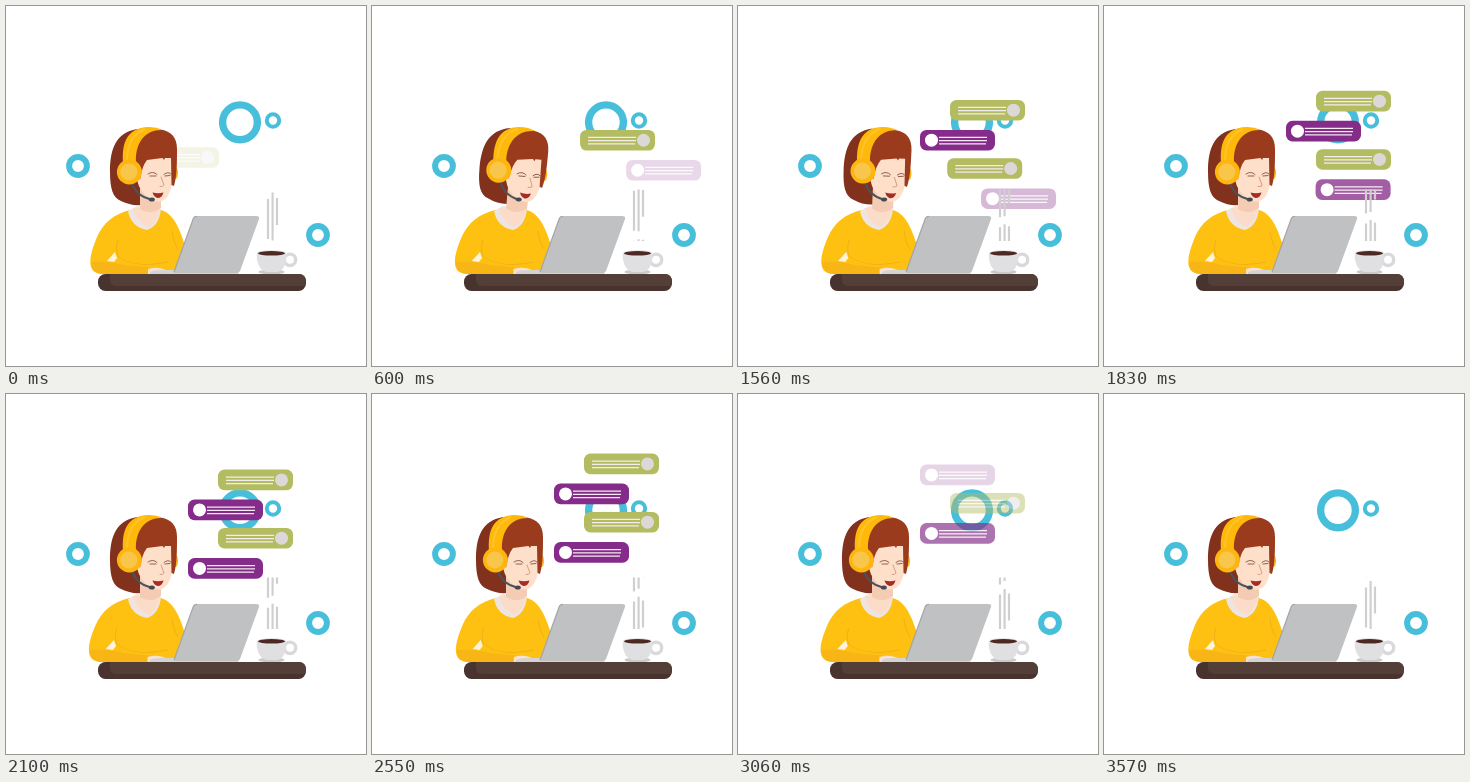
An HTML page that plays this animation: 360x360 px, repeating every 3600 ms.

```html
<!DOCTYPE html>
<html lang="en">
<head>
<meta charset="utf-8">
<title>Support chat</title>
<style>
  html, body { margin: 0; width: 100%; height: 100%; overflow: hidden; background: #fff; }
  svg { display: block; width: 100vw; height: 100vh; }
</style>
</head>
<body>
<svg viewBox="0 0 360 360">
  <defs>
    <clipPath id="steamArea"><rect x="255" y="183.5" width="24" height="51.5"/></clipPath>
    <g id="lines" fill="none" stroke="#f3ecee" stroke-width="1.3">
      <path d="M0 7.5H48M0 10.7H48M0 14H47"/>
    </g>
  </defs>

  <g fill="none" stroke="#48bfda">
    <circle cx="234" cy="116.3" r="17.4" stroke-width="7.4"/>
    <circle cx="267" cy="114.5" r="6.2" stroke-width="4"/>
    <circle cx="72" cy="160" r="8.9" stroke-width="6"/>
    <circle cx="312" cy="229" r="8.9" stroke-width="6"/>
  </g>

  <g id="bubbles"></g>

  <g id="steam" clip-path="url(#steamArea)" fill="none" stroke="#d0ced1" stroke-width="2.2"></g>

  <g id="cup">
    <circle cx="284" cy="253.8" r="5.7" fill="none" stroke="#d9d8db" stroke-width="3.4"/>
    <ellipse cx="265.5" cy="266" rx="13" ry="2.4" fill="#cbc9ce"/>
    <path d="M250.800 247C250 258 255 266 262 266H270C277 266 281 258 280.200 247Z" fill="#e0dfe2"/>
    <ellipse cx="265.500" cy="247.200" rx="14.800" ry="3.200" fill="#e8e6e8"/>
    <ellipse cx="265.500" cy="247.300" rx="13.500" ry="2.300" fill="#4c2a23"/>
  </g>

  <g id="body">
    <path d="M124 204C108 208 97 217 91 231C86 243 83 253 85 261Q87 268 97 268H168L181 246C176 230 170 208 155 204Z" fill="#fec111"/>
    <path d="M85 256Q100 254 118 259L158 263V268H97Q86 268 85 256Z" fill="#f8b616"/>
    <path d="M101 255L109 246L111 252L108 256Z" fill="#fff3dc"/>
    <path d="M112 250C121 258 139 261 162 256M112 234Q109 242 112 250M166 225Q167 235 172 243" fill="none" stroke="#f0b018" stroke-width="1"/>
    <path d="M142 263Q151 260 160 264L158 268H142Z" fill="#fbe1cf"/>
  </g>
  <path d="M122 205Q125 221 141 224Q153 220 155 203L148 200H131Z" fill="#eee5e3"/>
  <path d="M127 202Q130 217 143 221Q152 215 154 202Z" fill="#fbdcc8"/>

  <g id="head">
    <path d="M131 123C109 127 104 144 104 166C104 183 107 192 115 195Q125 200 135 199L140 150Z" fill="#82311d"/>
    <path d="M134 180V203Q144 210 155 202V188Z" fill="#f4ccb3"/>
    <path d="M131 150H167C169 169 166 187 159 193Q153 198 144 193Q134 187 131 174Z" fill="#fddfca"/>
    <ellipse cx="169.600" cy="167" rx="2.400" ry="6" fill="#fdb515"/>
    <path d="M128 154C127 136 139 122 154 123.500C166 125 171 132 171 143C171 157 171 170 168 180L165.500 179L165 152H159L158 154L156.500 152L141 154Q136 160 134 174Z" fill="#9b3b1e"/>
    <path d="M117 156C116 139 120 127 133 122.500Q146 119 157 124C140 123 129 136 130 156Z" fill="#ffb90b"/>
    <path d="M121 155C121 139 126 128 139 123" fill="none" stroke="#ffc42b" stroke-width="2"/>
    <g fill="none" stroke="#754031" stroke-linecap="round">
      <path d="M142 168Q147 164.500 151 168.500M158 168.500Q162 165 165 168M144 170L150 170M159 170L164 169.500" stroke-width=".8"/>
      <path d="M155 171L158 179Q157 181 154 180.500" stroke="#d7a084" stroke-width="1"/>
    </g>
    <path d="M146.500 186.500Q152 188 157.500 186.500Q156 192 151.500 192Q148 191 146.500 186.500Z" fill="#a52c27"/>
    <path d="M126 177Q130 190 145 193.500" fill="none" stroke="#4a535c" stroke-width="2"/>
    <ellipse cx="145.800" cy="193.500" rx="3" ry="2" fill="#434a53"/>
    <circle cx="123.400" cy="166" r="12.500" fill="#feb60f"/>
    <circle cx="122.800" cy="166" r="8.500" fill="#f8c64a"/>
  </g>

  <g id="laptop">
    <path d="M144 266Q148 263.500 158 264H234L232 268H144Z" fill="#d3d3d5"/>
    <path d="M191 210H250Q254 210 253 213L234 265Q233 267 230 267H168L187 213Q188 210 191 210Z" fill="#c0c1c3"/>
    <path d="M168 266L187.500 212Q188.500 210.300 191 210.300" fill="none" stroke="#a3a5a9" stroke-width="1.200"/>
  </g>
  <rect x="92" y="268" width="208" height="17" rx="7.500" fill="#49332f"/>
  <path d="M104 268H293Q300 268 300 276Q300 280 297 280H112Q104 280 104 274Z" fill="#543f38"/>
</svg>

<script>
const LOOP = 3600, SLIDE = 635, TRAVEL = 74, FADE = 300;
const NS = 'http://www.w3.org/2000/svg';
const byId = id => document.getElementById(id);
const clamp = v => Math.max(0, Math.min(1, v));
const smooth = (a, b, t) => { const p = clamp((t - a) / (b - a)); return p * p * (3 - 2 * p); };

function add(parent, tag, attrs) {
  const el = document.createElementNS(NS, tag);
  for (const key in attrs) el.setAttribute(key, attrs[key]);
  return parent.appendChild(el);
}

// Green messages enter from the left, purple ones from the right.
const bubbles = [
  { green: true, start: 0, end: 2930, drop: 0 },
  { green: false, start: 585, end: 3120, drop: 30 },
  { green: true, start: 950, end: 3195, drop: 58.3 },
  { green: false, start: 1450, end: 3260, drop: 88.5 }
];
for (const b of bubbles) {
  b.el = add(byId('bubbles'), 'g', {});
  add(b.el, 'rect', { width: 75, height: 20.6, rx: 6.5, fill: b.green ? '#b3bc60' : '#852b89' });
  add(b.el, 'circle', { cx: b.green ? 63.5 : 11.5, cy: 10.3, r: 6.5, fill: b.green ? '#dcd8d8' : '#fff' });
  add(b.el, 'use', { href: '#lines', x: b.green ? 8 : 19 });
}

// Each wisp is a dash pattern that climbs one period per loop.
const wisps = [
  { x: 262, top: 193, dash: 40, period: 50 },
  { x: 266.6, top: 186.5, dash: 48, period: 56 },
  { x: 271, top: 192, dash: 27, period: 50 }
];
for (const w of wisps) {
  w.el = add(byId('steam'), 'path', {
    d: `M${w.x} ${w.top - w.period}v${w.period * 4}`,
    'stroke-dasharray': `${w.dash} ${w.period - w.dash}`
  });
}

function draw(t) {
  const s = (t - 600) / 1000;
  const scroll = 124 - 29.7 * s - 1.7 * s * s;
  for (const b of bubbles) {
    const age = t - b.start;
    const left = TRAVEL * (1 - clamp(age / SLIDE));
    const x = b.green ? 212 - left : 182 + left;
    const alpha = age < 0 ? 0 : Math.min(clamp(0.15 + age * 0.0016), clamp((b.end - t) / FADE));
    b.el.setAttribute('transform', `translate(${x} ${scroll + b.drop})`);
    b.el.setAttribute('opacity', alpha);
  }

  for (const w of wisps) w.el.setAttribute('stroke-dashoffset', w.period * t / LOOP);

  const lean = 5 * (smooth(100, 600, t) - smooth(1250, 1850, t));
  byId('head').setAttribute('transform', `rotate(${lean} 146 204)`);

  const typing = Math.sin(Math.PI * t / 900) ** 2;
  byId('body').setAttribute('transform', `translate(170 0) scale(${1 + 0.023 * typing} 1) translate(-170 0)`);
}

function tick() {
  draw(performance.now() % LOOP);
  requestAnimationFrame(tick);
}
tick();
</script>
</body>
</html>
```
